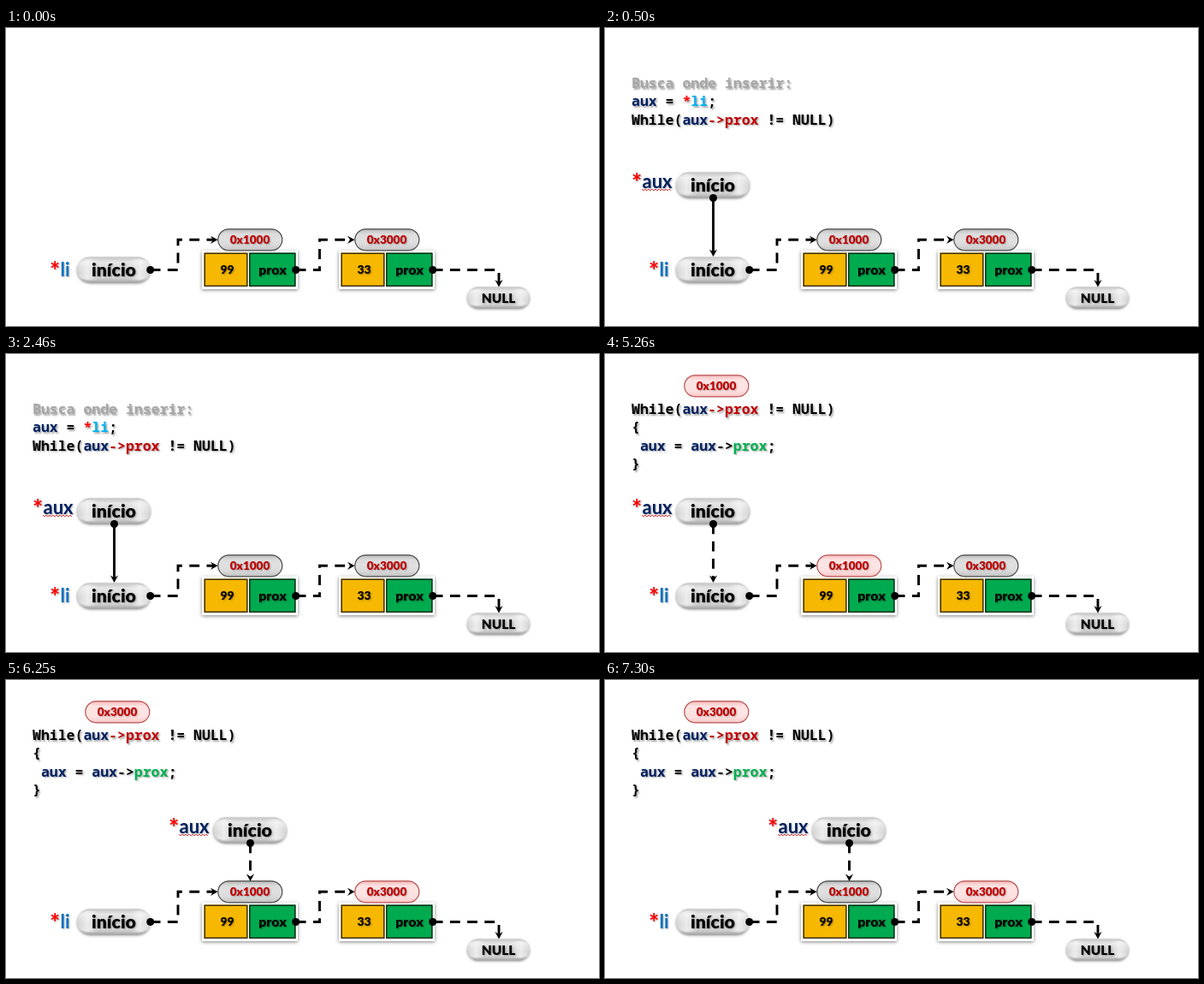
These frames come from a looping animation (693x348 px, 8 s). An HTML page with a canvas:

```html
<!DOCTYPE html>
<html lang="pt">
<head>
<meta charset="utf-8">
<title>Lista encadeada</title>
<style>
  html, body { margin: 0; width: 100%; height: 100%; overflow: hidden; background: #fff; }
  canvas { display: block; }
</style>
</head>
<body>
<canvas id="stage" width="693" height="348"></canvas>
<script>
const ctx = document.getElementById('stage').getContext('2d');
const LOOP = 8000;
const SCENE_STARTS = [0, 500, 3770, 6250];
const SANS = 'Lato, "Open Sans", sans-serif';
const MONO = '"Noto Sans Mono", "DejaVu Sans Mono", monospace';
const BLACK = '#000', NAVY = '#002060', RED = '#ff0000', CRIMSON = '#c00000',
      GREEN = '#00b050', SKY = '#00b0f0', BLUE = '#0070c0', GRAY = '#a6a6a6';

function shadow(color, blur, dx, dy) {
  ctx.shadowColor = color;
  ctx.shadowBlur = blur;
  ctx.shadowOffsetX = dx;
  ctx.shadowOffsetY = dy;
}

function noShadow() {
  shadow('transparent', 0, 0, 0);
}

function label(str, x, y, size, { color = BLACK, align = 'center', weight = 900 } = {}) {
  ctx.font = `${weight} ${size}px ${SANS}`;
  ctx.textAlign = align;
  ctx.fillStyle = color;
  shadow('rgba(0,0,0,.3)', 2, 1, 1);
  ctx.fillText(str, x, y);
  noShadow();
}

// Draws a line of code from [text, color] pairs.
function codeLine(row, ...parts) {
  let x = 31;
  ctx.font = `bold 16.5px ${MONO}`;
  ctx.textAlign = 'left';
  shadow('rgba(0,0,0,.35)', 2, 1.5, 1.5);
  for (const [str, color = BLACK] of parts) {
    ctx.fillStyle = color;
    ctx.fillText(str, x, 70 + row * 21.4);
    x += ctx.measureText(str).width;
  }
  noShadow();
}

function gradient(x0, y0, x1, y1, colors) {
  const fill = ctx.createLinearGradient(x0, y0, x1, y1);
  colors.forEach((c, i) => fill.addColorStop(i / (colors.length - 1), c));
  return fill;
}

function pillPath(x, y, w, h) {
  ctx.beginPath();
  ctx.roundRect(x, y, w, h, h / 2);
}

function metalPill(x, y, w, h, str, size, baseline) {
  pillPath(x, y, w, h);
  ctx.fillStyle = gradient(0, y, 0, y + h,
    ['#c4c4c4', '#e6e6e6', '#dadada', '#d2d2d2', '#d8d8d8', '#a2a2a2']);
  shadow('rgba(0,0,0,.4)', 3, 0, 1);
  ctx.fill();
  noShadow();
  const glint = 'rgba(255,255,255,.55)', clear = 'rgba(255,255,255,0)';
  ctx.fillStyle = gradient(x, y, x + w, y, [clear, glint, clear, clear, clear, clear, glint, clear]);
  pillPath(x + 1, y + 2, w - 2, h - 5);
  ctx.fill();
  label(str, x + w / 2, baseline, size);
}

function addressPill(x, y, str, active) {
  pillPath(x + .8, y + .8, 75, 25);
  ctx.fillStyle = gradient(0, y, 0, y + 26, active
    ? ['#f6b4b4', '#ffe2e2', '#ffe4e4', '#ffe0e0', '#f8c4c4']
    : ['#b4b4b4', '#dcdcdc', '#e0e0e0', '#dadada', '#c0c0c0']);
  ctx.fill();
  ctx.strokeStyle = active ? '#b85050' : '#484848';
  ctx.lineWidth = 1.2;
  ctx.stroke();
  label(str, x + 38, y + 18, 13.5, { color: CRIMSON });
}

function cell(x, w, fill, border) {
  ctx.fillStyle = fill;
  ctx.fillRect(x, 262.5, w, 39.5);
  ctx.strokeStyle = border;
  ctx.lineWidth = 1.5;
  ctx.strokeRect(x + .75, 263.25, w - 1.5, 38);
}

function node(x, value) {
  ctx.fillStyle = '#fff';
  shadow('rgba(0,0,0,.5)', 4, 0, 1);
  ctx.fillRect(x - 3, 259.5, 112, 45.5);
  noShadow();
  cell(x - .5, 51, '#f6b800', '#3c3010');
  cell(x + 52, 54.5, '#00aa4e', '#102c18');
  label(value, x + 26.5, 287, 13.8);
  label('prox', x + 79.5, 288, 15.9);
}

// Connects points with a dot at the start and an arrowhead at the end.
function arrow(points, dashed = true) {
  const [sx, sy] = points[0];
  const [ex, ey] = points[points.length - 1];
  const [px, py] = points[points.length - 2];
  const angle = Math.atan2(ey - py, ex - px);
  ctx.strokeStyle = ctx.fillStyle = BLACK;
  ctx.lineWidth = 2.9;
  ctx.setLineDash(dashed ? [11.8, 8.4] : []);
  ctx.beginPath();
  points.slice(0, -1).forEach(([x, y]) => ctx.lineTo(x, y));
  ctx.lineTo(ex - 5 * Math.cos(angle), ey - 5 * Math.sin(angle));
  ctx.stroke();
  ctx.setLineDash([]);
  ctx.beginPath();
  ctx.arc(sx, sy, 4.5, 0, Math.PI * 2);
  ctx.fill();
  ctx.save();
  ctx.translate(ex, ey);
  ctx.rotate(angle);
  ctx.beginPath();
  [[0, 0], [-8.5, -4.6], [-5.5, 0], [-8.5, 4.6]].forEach(p => ctx.lineTo(...p));
  ctx.fill();
  ctx.restore();
}

function pointerName(x, y, str, color) {
  label('*', x, y + 3, 29, { color: RED, align: 'left', weight: 700 });
  label(str, x + 12.5, y, 22, { color, align: 'left', weight: 700 });
}

function squiggle(x, y, w) {
  ctx.beginPath();
  for (let i = 0; i <= w; i += 2) ctx.lineTo(x + i, y + (i % 4 ? 1 : -1));
  ctx.strokeStyle = '#e04040';
  ctx.lineWidth = 1;
  ctx.stroke();
}

function auxPointer(x, y, tipY, dashed) {
  pointerName(x - 51, y + 19, 'aux', NAVY);
  squiggle(x - 39, y + 21, 35);
  metalPill(x + 1, y + .5, 86, 30, 'início', 21.3, y + 23);
  arrow([[x + 44.5, y + 30.5], [x + 44.5, tipY]], dashed);
}

function list(activeNode) {
  pointerName(51, 290, 'li', BLUE);
  metalPill(83, 267.5, 86, 30, 'início', 21.3, 290);
  metalPill(539, 302.5, 73, 25, 'NULL', 15.4, 321);
  node(232, '99');
  node(392, '33');
  addressPill(247, 234, '0x1000', activeNode === 1);
  addressPill(407, 234, '0x3000', activeNode === 2);
  arrow([[168.7, 282.5], [201, 282.5], [201, 247.3], [247.5, 247.3]]);
  arrow([[338.7, 282.5], [366.5, 282.5], [366.5, 247.3], [407.5, 247.3]]);
  arrow([[498.7, 282.5], [576, 282.5], [576, 302.5]]);
}

function whileLine(row) {
  codeLine(row, ['While('], ['aux', NAVY], ['->prox', CRIMSON], [' != NULL)']);
}

function searchCode() {
  codeLine(0, ['Busca onde inserir:', GRAY]);
  codeLine(1, ['aux', NAVY], [' = '], ['*', RED], ['li', SKY], [';']);
  whileLine(2);
}

function loopCode(address) {
  addressPill(92, 24, address, true);
  whileLine(0);
  codeLine(1, ['{']);
  codeLine(2, [' aux', NAVY], [' = '], ['aux', NAVY], ['->'], ['prox', GREEN], [';']);
  codeLine(3, ['}']);
}

const scenes = [
  () => list(0),
  () => { list(0); searchCode(); auxPointer(82, 168, 267, false); },
  () => { list(1); loopCode('0x1000'); auxPointer(82, 168, 267, true); },
  () => { list(2); loopCode('0x3000'); auxPointer(241, 160, 235, true); }
];

function render(now) {
  const t = now % LOOP;
  const current = SCENE_STARTS.filter(start => t >= start).length - 1;
  ctx.fillStyle = '#fff';
  ctx.fillRect(0, 0, 693, 348);
  scenes[Math.max(0, current)]();
  requestAnimationFrame(render);
}

requestAnimationFrame(render);
</script>
</body>
</html>
```
